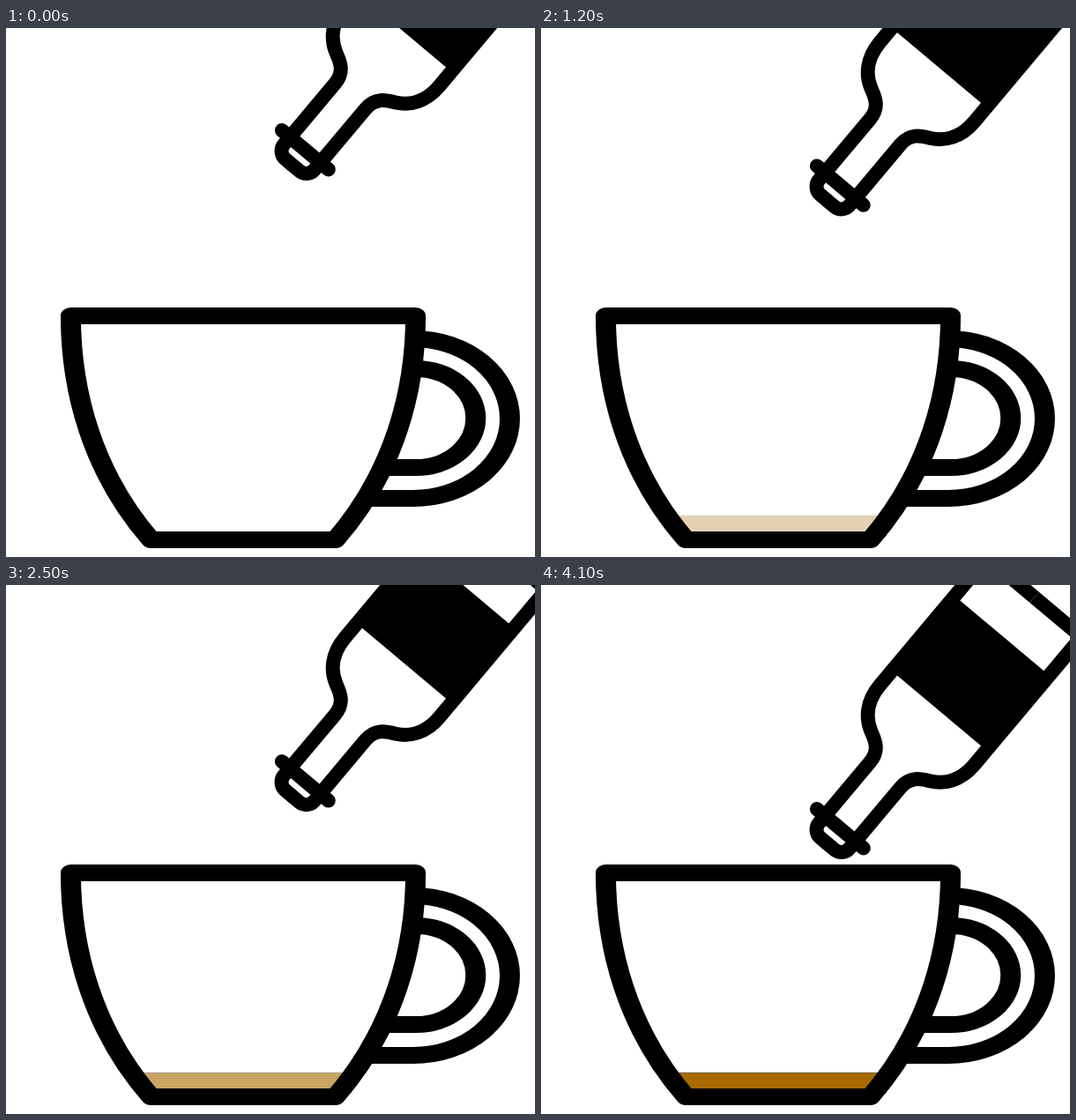
An HTML page for the animation above (5100 ms loop, 600x600 px).

```html
<!DOCTYPE html>
<html lang="en">
<head>
<meta charset="utf-8">
<title>Bottle and cup</title>
<style>
  html, body { margin: 0; width: 100%; height: 100%; overflow: hidden; background: #fff; }
  svg { display: block; width: 100%; height: 100%; }
</style>
</head>
<body>
<svg viewBox="0 0 600 600" fill="none" stroke="#000" stroke-linejoin="round">
  <path id="drink" d="M150 553.2H390L375 575H165Z" fill="#a86a00" stroke-width=".5" opacity="0"/>

  <!-- cup: widened sideways, so its upright strokes are thicker -->
  <g transform="translate(269 0) scale(1.21 1)" stroke-width="19">
    <path d="M159.5 352.5A90.5 90.5 0 0 1 159.5 533.5H114"/>
    <path d="M162 386.5A56 56 0 0 1 162 498.5H131"/>
    <path d="M-161.6 326.5H161.6C161.6 411 141.7 503.5 86.4 580.5H-86.4C-141.7 503.5 -161.6 411 -161.6 326.5Z"/>
  </g>

  <g id="bottle">
    <g transform="rotate(40) translate(437.5 0)" stroke-width="16">
      <path id="half" d="M0 -349H-70V-160C-70 -136 -58.5 -121 -44 -113.5C-33.5 -108.5 -22.5 -103 -22.5 -86V4A12 12 0 0 0 -10.5 16H.5"/>
      <use href="#half" transform="scale(-1 1)"/>
      <path d="M-34.5 -6.5H34.5" stroke-linecap="round"/>
      <rect x="-63" y="-292" width="126" height="111" fill="#000" stroke="none"/>
    </g>
  </g>
</svg>
<script>
  const LOOP = 5100, STEP = 100, LAST = 41, DROP = 138;
  const bottle = document.getElementById('bottle');
  const drink = document.getElementById('drink');
  const start = performance.now();

  function draw() {
    const time = (performance.now() - start) % LOOP;
    const progress = Math.min(Math.floor(time / STEP), LAST) / LAST;
    bottle.setAttribute('transform', `translate(0 ${DROP * (progress - 1)})`);
    drink.setAttribute('opacity', progress);
    requestAnimationFrame(draw);
  }
  draw();
</script>
</body>
</html>
```
